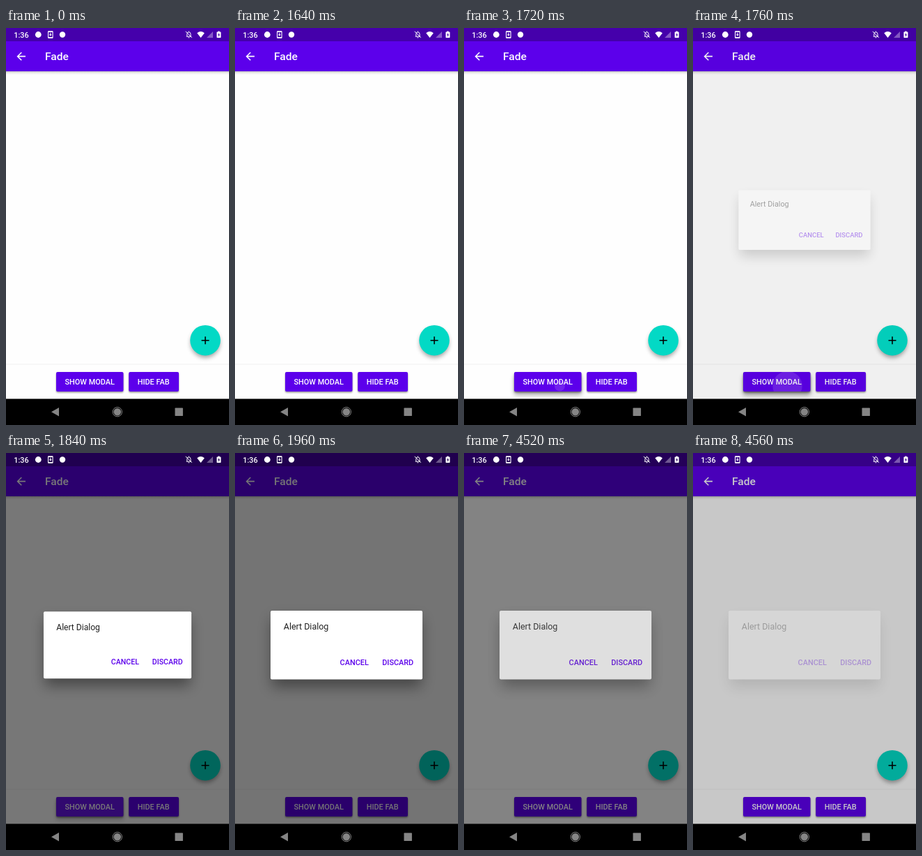
An HTML page for the animation above (4.6 s loop, 320x569 px).

```html
<!DOCTYPE html>
<html lang="en">
<head>
<meta charset="utf-8">
<title>Fade</title>
<style>
  html, body { margin: 0; width: 100%; height: 100%; overflow: hidden; background: #000; }
  svg { display: block; width: 100vw; height: 100vh; }
  text { font-family: Roboto, sans-serif; font-size: 10.9px; font-weight: 500; }
  .light { fill: #fff; }
  .accent { fill: #5c00eb; }
</style>
</head>
<body>
<svg viewBox="0 0 320 569" preserveAspectRatio="none">
  <defs>
    <linearGradient id="barShade" x2="0" y2="1">
      <stop stop-opacity=".26"/><stop offset=".4" stop-opacity=".08"/><stop offset="1" stop-opacity="0"/>
    </linearGradient>
    <filter id="blur1" x="-20%" y="-50%" width="140%" height="200%"><feGaussianBlur stdDeviation="1.3"/></filter>
    <filter id="blur3" x="-30%" y="-70%" width="160%" height="240%"><feGaussianBlur stdDeviation="3"/></filter>
    <filter id="blur10" x="-30%" y="-60%" width="160%" height="220%"><feGaussianBlur stdDeviation="10"/></filter>
    <clipPath id="modalClip"><rect x="72" y="493" width="96.5" height="28" rx="2"/></clipPath>
  </defs>

  <!-- page -->
  <rect width="320" height="532" fill="#fefefe"/>
  <rect y="62" width="320" height="5" fill="url(#barShade)"/>
  <rect width="320" height="19.3" fill="#4500ab"/>
  <rect class="accent" y="19" width="320" height="43"/>
  <path class="light" transform="translate(12.4 31.3) scale(.778)"
    d="M20 11H7.83l5.59-5.59L12 4l-8 8 8 8 1.41-1.41L7.83 13H20z"/>
  <text class="light" x="56" y="46.3" style="font-size:15.56px">Fade</text>

  <rect y="481.5" width="320" height="1" fill="#f1f1f1"/>

  <g filter="url(#blur1)" opacity=".42">
    <rect x="72" y="494.6" width="96.5" height="28" rx="2"/>
    <rect x="176.2" y="494.6" width="71.8" height="28" rx="2"/>
  </g>
  <rect id="lift" x="72" y="498" width="96.5" height="28" rx="2" filter="url(#blur3)" opacity="0"/>
  <rect class="accent" x="72" y="493" width="96.5" height="28" rx="2"/>
  <rect class="accent" x="176.2" y="493" width="71.8" height="28" rx="2"/>
  <g clip-path="url(#modalClip)"><circle id="ripple" class="light" cy="513" opacity="0"/></g>
  <text class="light" x="84.5" y="510.9">SHOW MODAL</text>
  <text class="light" x="188.7" y="510.9">HIDE FAB</text>

  <circle cx="286" cy="451.5" r="21" filter="url(#blur3)" opacity=".36"/>
  <circle cx="286" cy="447.7" r="21.8" fill="#03d9c5"/>
  <path d="M280.5 447.7h11M286 442.2v11" stroke="#000" stroke-width="1.56"/>

  <rect id="scrim" width="320" height="532" opacity="0"/>

  <!-- status bar -->
  <g class="light">
    <text x="11.3" y="13.6">1:36</text>
    <circle cx="46.3" cy="9.5" r="4.4"/>
    <path fill-rule="evenodd" d="M61 4.2h5.6q1 0 1 1v8.6q0 1-1 1H61q-1 0-1-1V5.2q0-1 1-1zM61.1 6v7h5.4V6z"/>
    <path d="M63.3 6.8h1v2.4h1.5l-2 2.3-2-2.3h1.5z"/>
    <circle cx="81" cy="9.5" r="4.2"/>
    <path d="M274.2 7.2q5.2-4.4 10.6 0L279.5 14z"/>
    <path d="M288 14h9V5z" opacity=".35"/>
    <path fill-rule="evenodd" d="M304.4 4.5h2v1h1.2q.8 0 .8.8v7q0 .8-.8.8h-4.4q-.8 0-.8-.8v-7q0-.8.8-.8h1.2zM305.8 6.8l-1.8 3.5h1.1v2.6l1.8-3.6h-1.1z"/>
  </g>
  <g fill="none" stroke="#fff">
    <path d="M258.8 12.2h7.2M259.8 12V8.8q0-2.7 2.6-2.9 2.6.2 2.6 2.9V12M262.4 4.5v1.2M261.6 13.8h1.6"/>
    <path d="M257.7 4.8l9 9"/>
  </g>

  <!-- dialog -->
  <g id="dialog" opacity="0">
    <rect x="53" y="238" width="214" height="97" rx="2" filter="url(#blur10)" opacity=".4"/>
    <rect x="51" y="226" width="218" height="98.5" rx="2" fill="#fff"/>
    <text x="69.8" y="253" fill="#212121" style="font-size:12.44px;font-weight:400">Alert Dialog</text>
    <text class="accent" x="150.6" y="303.6">CANCEL</text>
    <text class="accent" x="211.2" y="303.6">DISCARD</text>
  </g>

  <!-- navigation bar -->
  <rect y="531.5" width="320" height="37.5"/>
  <g fill="#858585">
    <path d="M65 550.3l11-6.3v12.6z"/>
    <circle cx="159.8" cy="550.2" r="5.3"/>
    <circle cx="159.8" cy="550.2" r="6.7" fill="none" stroke="#858585"/>
    <rect x="242.5" y="544.6" width="11.4" height="11.4" rx=".6"/>
  </g>
</svg>
<script>
  const LOOP = 4600, STEP = 40;
  const SHOW = 1738, ENTER = 190, HIDE = 4499, DIM = 0.54;
  const el = id => document.getElementById(id);
  const dialog = el('dialog'), scrim = el('scrim'), ripple = el('ripple'), lift = el('lift');

  const clamp = v => Math.min(1, Math.max(0, v));
  const part = (t, start, length) => clamp((t - start) / length);
  const smooth = p => p * p * (3 - 2 * p);

  // cubic-bezier(0, 0, .2, 1)
  function decelerate(x) {
    let lo = 0, hi = 1;
    for (let i = 0; i < 20; i++) {
      const s = (lo + hi) / 2;
      if (0.6 * (1 - s) * s * s + s ** 3 < x) lo = s; else hi = s;
    }
    return lo * lo * (3 - 2 * lo);
  }

  function set(node, attrs) {
    for (const key in attrs) node.setAttribute(key, attrs[key]);
  }

  function draw(t) {
    const scale = 0.8 + 0.2 * decelerate(part(t, SHOW, ENTER));
    const alpha = part(t, SHOW, ENTER * 0.3) * (1 - part(t, HIDE, 83));
    const dim = smooth(part(t, SHOW, 112)) - smooth(part(t, HIDE, 107));
    set(dialog, {
      opacity: alpha,
      transform: `translate(160 275) scale(${scale}) translate(-160 -275)`
    });
    set(scrim, { opacity: DIM * dim });

    const spread = part(t, 1680, 160);
    set(ripple, {
      cx: 138 - 10 * spread * spread,
      r: 60 * spread ** 1.5,
      opacity: 0.13 * part(t, 1660, 60) * (1 - part(t, 1790, 130))
    });
    set(lift, { opacity: 0.4 * part(t, 1640, 100) * (1 - part(t, 1780, 120)) });
  }

  const began = performance.now();
  function tick() {
    const t = (performance.now() - began) % LOOP;
    draw(Math.floor(t / STEP) * STEP);
    requestAnimationFrame(tick);
  }
  tick();
</script>
</body>
</html>
```
